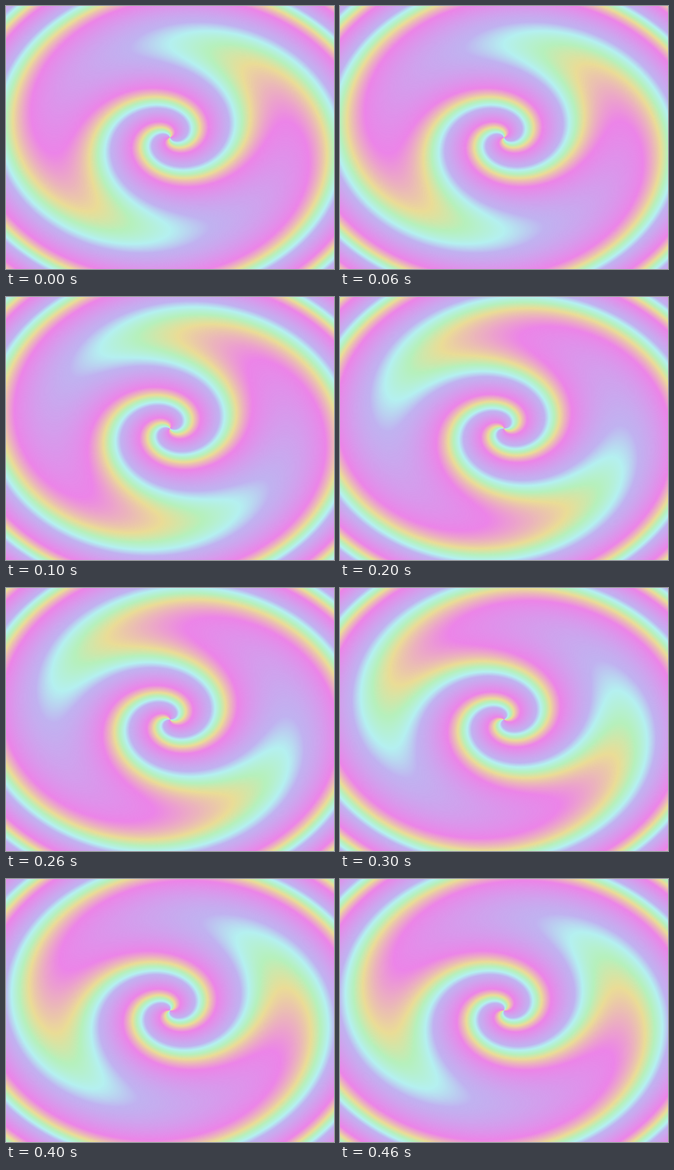
Write an HTML page with a canvas that moves like this. It is 500x400 px and loops after 0.5 s.

```html
<!DOCTYPE html>
<html>
<head>
<meta charset="utf-8">
<style>
  html, body { margin: 0; width: 100%; height: 100%; overflow: hidden; }
  canvas { display: block; }
</style>
</head>
<body>
<canvas id="stage" width="500" height="400"></canvas>
<script>
const W = 500, H = 400, STEPS = 5, STEP_MS = 100, SHADES = 500;
const ctx = document.getElementById('stage').getContext('2d');

// Cyclic palette, sampled from a gradient whose bands double in width.
const colours = ['#b4f0f0', '#b6f0bc', '#eadc96', '#ec84e8', '#c0b2f0'];
const gradient = ctx.createLinearGradient(0, 0, SHADES, 0);
colours.forEach((colour, i) => gradient.addColorStop(i && 2 ** (i - 1) / 9, colour));
gradient.addColorStop(1, colours[0]);
ctx.fillStyle = gradient;
ctx.fillRect(0, 0, SHADES, 1);
const palette = new Uint32Array(ctx.getImageData(0, 0, SHADES, 1).data.buffer);

// Two-armed spiral: the twist rises and falls once between centre and corner.
function phaseAt(x, y) {
  const u = 2 * x / W - 1, v = 1 - 2 * y / H;
  const twist = 2 * Math.sin(Math.PI * Math.hypot(u, v) / Math.SQRT2);
  return twist - Math.atan2(v, u) / Math.PI + 1.5;
}
const phase = Float32Array.from({ length: W * H },
  (_, i) => phaseAt(i % W + .5, Math.floor(i / W) + .5));

const image = ctx.createImageData(W, H);
const pixels = new Uint32Array(image.data.buffer);
let shown = -1;

function draw() {
  const step = Math.floor(performance.now() / STEP_MS) % STEPS;
  if (step !== shown) {
    shown = step;
    phase.forEach((p, i) => {
      pixels[i] = palette[Math.floor((p + step / STEPS) * SHADES) % SHADES];
    });
    ctx.putImageData(image, 0, 0);
  }
  requestAnimationFrame(draw);
}
draw();
</script>
</body>
</html>
```
